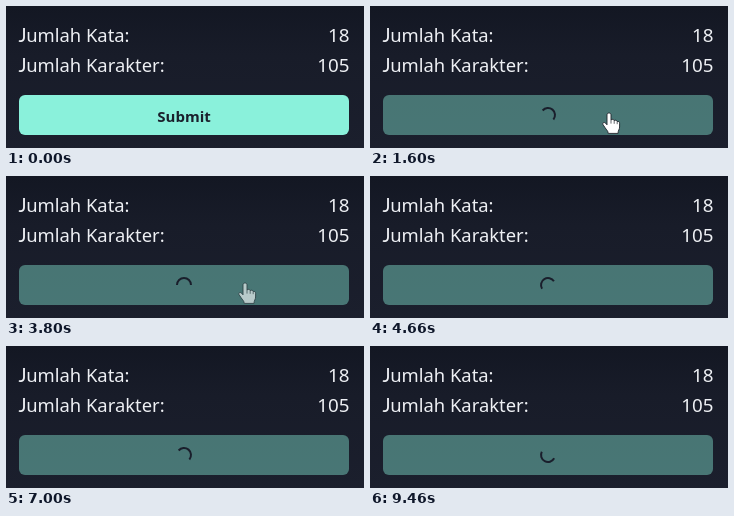
Recreate the animation shown at these times as an HTML page. Size 358 by 142 pixels, loop 9530 ms.

```html
<!DOCTYPE html>
<html lang="id">
<head>
<meta charset="utf-8">
<title>Jumlah Kata</title>
<style>
  html, body { margin: 0; width: 100%; height: 100%; overflow: hidden; background: #181c29; }
  svg { display: block; width: 100%; height: 100%; }
  text { font-family: "Noto Sans", "Open Sans", sans-serif; font-size: 18.4px; fill: #eef0f4; }
  .cap { font-family: Lato, Roboto, sans-serif; font-size: 19px; }
  .num { font-size: 18.8px; text-anchor: end; }
  #label { font-size: 15px; font-weight: 600; text-anchor: middle; fill: #1a202c; }
</style>
</head>
<body>
<svg viewBox="0 0 358 142">
  <defs>
    <linearGradient id="bg" x1="0" y1="0" x2="0" y2="1">
      <stop offset="0" stop-color="#131723"/>
      <stop offset=".35" stop-color="#181c29"/>
      <stop offset="1" stop-color="#1b1f2d"/>
    </linearGradient>
  </defs>
  <rect width="358" height="142" fill="url(#bg)"/>
  <text y="36"><tspan class="cap" x="12.6">J</tspan><tspan x="20.2">umlah Kata:</tspan></text>
  <text class="num" x="343.5" y="36">18</text>
  <text y="66"><tspan class="cap" x="12.6">J</tspan><tspan x="20.2">umlah Karakter:</tspan></text>
  <text class="num" x="343.5" y="66">105</text>

  <g id="button">
    <rect id="face" x="13" y="89" width="330" height="40" rx="6"/>
    <text id="label" x="178" y="116">Submit</text>
    <path id="spinner" d="M-4.95-4.95A7 7 0 0 1 4.95 4.95" fill="none" stroke="#1a202c" stroke-width="2"/>
  </g>

  <circle id="ring" fill="none" stroke="#b40a1e" stroke-width="4"/>
  <g id="cursor" fill="#fff" stroke="#20242c" stroke-width=".9" stroke-linejoin="round">
    <path id="arrow" d="M0 0V16.5L3.8 13L6.3 18.8L8.8 17.7L6.3 12H11.6Z"/>
    <g id="hand">
      <path d="M-2 1.8C-2-.6 2-.6 2 1.8V7C3 5.8 5 6.3 5.2 7.6C6.4 6.7 8 7.3 8.2 8.6C9.4 8 10.6 8.8 10.6 10.2V14C10.6 16.4 9 17.4 9 20.4H-.8C-.8 18-2.6 16.8-4 14.6L-6 11.6C-7 9.8-4.6 8.8-3.4 10.2L-2 11.8Z"/>
      <path d="M2 7V10.6M5.2 7.8V10.8M8.2 8.8V11.2" fill="none" stroke-width=".7"/>
    </g>
  </g>
</svg>
<script>
const LOOP = 9530, FPS = 15;
const HOVER = 700, PRESS = 930, LOAD = 1190, HIDE = 3700;
const IDLE_COLOR = [138, 241, 219], HOVER_COLOR = [90, 223, 200];
const $ = id => document.getElementById(id);
const clamp = v => Math.max(0, Math.min(1, v));
const span = (t, start, length) => clamp((t - start) / length);
const smooth = p => p * p * (3 - 2 * p);
const mix = (a, b, p) => a + (b - a) * p;
const set = (id, attrs) => {
  for (const key in attrs) $(id).setAttribute(key, attrs[key]);
};

function step(t) {
  const at = n => Math.floor(n * 100 / FPS) * 10;
  let n = Math.floor(t * FPS / 1000);
  if (at(n + 1) <= t) n++;
  return at(n);
}

function draw(t) {
  const loading = t >= LOAD;
  const hover = smooth(span(t, HOVER, 200)) * (1 - smooth(span(t, LOAD, 200)));
  const rgb = IDLE_COLOR.map((c, i) => Math.round(mix(c, HOVER_COLOR[i], hover)));
  set('face', { fill: `rgb(${rgb})` });
  set('button', { opacity: mix(1, .415, smooth(span(t, LOAD, 200))) });
  set('label', { opacity: loading ? 0 : 1 });
  set('spinner', {
    opacity: loading ? 1 : 0,
    transform: `translate(178 109) rotate(${(t * .8 + 155) % 360})`
  });

  const move = smooth(span(t, 270, 640));
  const x = mix(374, 239, move), y = mix(82, 107, move);
  const over = x < 343 && y > 89;
  set('cursor', {
    transform: `translate(${x} ${y})`,
    opacity: 1 - span(t, HIDE, 260)
  });
  set('hand', { opacity: over ? 1 : 0 });
  set('arrow', { opacity: over ? 0 : 1 });

  const grow = span(t, PRESS, 270);
  set('ring', {
    cx: 239, cy: 107,
    r: 33 * Math.sin(grow * Math.PI / 2) + 6 * grow * (1 - grow),
    opacity: t < PRESS ? 0 : .72 * (1 - span(t, 1090, 260))
  });
}

const start = performance.now();
function tick() {
  draw(step((performance.now() - start) % LOOP));
  requestAnimationFrame(tick);
}
draw(0);
requestAnimationFrame(tick);
</script>
</body>
</html>
```
